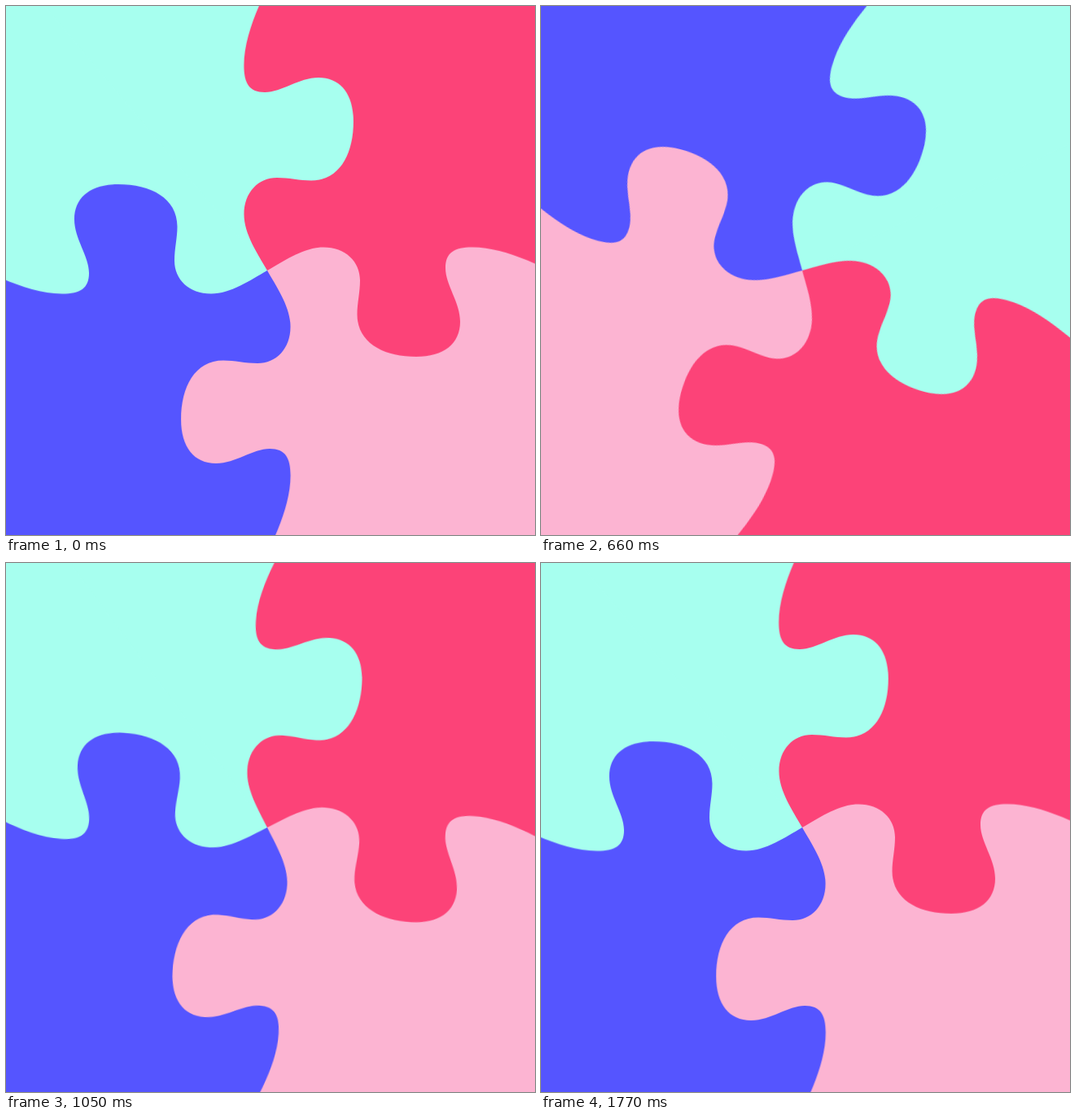
An HTML page without scripts that plays this animation: 650x650 px, repeating every 1.8 s.

```html
<!DOCTYPE html>
<html lang="en">
<head>
<meta charset="utf-8">
<title>Turning puzzle</title>
<style>
  html, body { margin: 0; width: 100%; height: 100%; overflow: hidden; background: #a7ffef; }
  svg { display: block; width: 100vw; height: 100vh; }

  .mint { fill: #a7ffef; }
  .red { fill: #fc4378; }
  .pink { fill: #fcb4d2; }
  .blue { fill: #5555ff; }

  /* One full turn that swings past, dips back and settles, then rests. */
  .puzzle { animation: turn 1800ms -1740ms infinite; }
  @keyframes turn {
    0% { transform: rotate(0deg); }
    6.667% { transform: rotate(0deg); animation-timing-function: cubic-bezier(.795, 0, .566, 1); }
    56.667% { transform: rotate(364deg); animation-timing-function: cubic-bezier(.42, 0, .58, 1); }
    73.333% { transform: rotate(358deg); animation-timing-function: cubic-bezier(.42, 0, .4, 1); }
    100% { transform: rotate(360deg); }
  }
</style>
</head>
<body>
<svg viewBox="0 0 650 650">
  <defs>
    <!-- Jigsaw edge going up from the centre, closed well past the next edge. -->
    <path id="piece" d="M0 0
      C-12-21-28.5-45-28.5-69
      C-28.5-96-11-114 12-114
      C27-114 40-110.5 54-110.5
      C89-110.5 106-143 106-183
      C106-217 90-237 63-237
      C39-237 18-219-3-219
      C-22-219-28.5-230-28.5-252
      C-28.5-276-20-302-10-325
      L60-487 700-700 700 700Z"/>
    <clipPath id="near-edge"><path d="M0 0 613-514 700-900-700-900-613-514Z"/></clipPath>
  </defs>
  <g transform="translate(321 325)">
    <g class="puzzle">
      <!-- Each piece covers the tail of the one before; the last only needs its own edge. -->
      <use href="#piece" class="red"/>
      <use href="#piece" class="pink" transform="rotate(90)"/>
      <use href="#piece" class="blue" transform="rotate(180)"/>
      <g transform="rotate(270)">
        <use href="#piece" class="mint" clip-path="url(#near-edge)"/>
      </g>
    </g>
  </g>
</svg>
</body>
</html>
```
